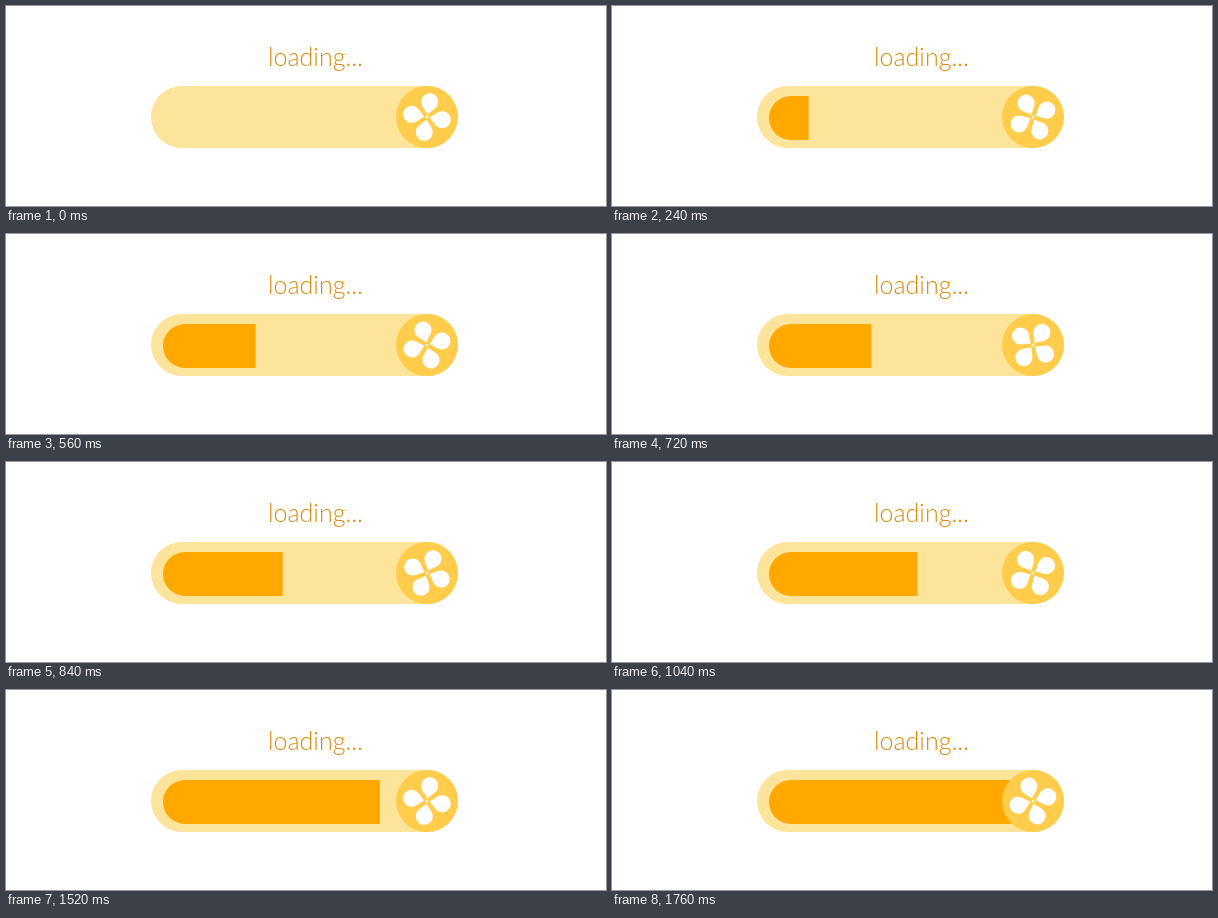
Animation of 600 by 200 pixels, one loop 1800 ms. Source, as an HTML page:

```html
<!DOCTYPE html>
<html lang="en">
<head>
<meta charset="utf-8">
<title>Loading</title>
<style>
html, body { margin: 0; width: 100%; height: 100%; overflow: hidden; background: #fff; }
svg { display: block; width: 600px; height: 200px; }
text { font: 300 25px Lato, "Open Sans", sans-serif; fill: #dd8a0c; }
</style>
</head>
<body>
<svg viewBox="0 0 600 200">
  <defs>
    <path id="petal" d="M0-2.5C-2.5-7-8.5-9.5-8.5-15.5A8.5 8.5 0 0 1 8.5-15.5C8.5-9.5 2.5-7 0-2.5Z"/>
    <clipPath id="progress"><rect id="reveal" x="157" y="80" width="0" height="62"/></clipPath>
  </defs>
  <text x="262" y="60">loading...</text>
  <rect x="145" y="80" width="307" height="62" rx="31" fill="#fce49b"/>
  <rect x="157" y="90" width="290" height="44" rx="22" fill="#ffa800" clip-path="url(#progress)"/>
  <circle cx="421" cy="111" r="31" fill="#ffcd4b"/>
  <g id="fan" fill="#fff">
    <use href="#petal"/>
    <use href="#petal" transform="rotate(90)"/>
    <use href="#petal" transform="rotate(180)"/>
    <use href="#petal" transform="rotate(270)"/>
    <circle r="1.4" opacity=".8"/>
  </g>
</svg>
<script>
const LOOP = 1800, STEP = 40;
const reveal = document.getElementById("reveal");
const fan = document.getElementById("fan");

// Keys: [time in ms, right edge of the fill, fan angle]
const keys = [
  [0, 157, 10],
  [560, 249.5, 345],
  [680, 253.6, 370],
  [1240, 334.3, 730],
  [1800, 413.3, 1090]
];

function pose(t) {
  const i = keys.findIndex(k => k[0] > t);
  const a = keys[i - 1], b = keys[i];
  const p = (t - a[0]) / (b[0] - a[0]);
  return [1, 2].map(j => a[j] + (b[j] - a[j]) * p);
}

function draw() {
  const t = Math.floor((performance.now() % LOOP) / STEP) * STEP;
  const [edge, angle] = pose(t);
  reveal.setAttribute("width", edge - 157);
  fan.setAttribute("transform", `translate(421 111) rotate(${angle})`);
  requestAnimationFrame(draw);
}
draw();
</script>
</body>
</html>
```
